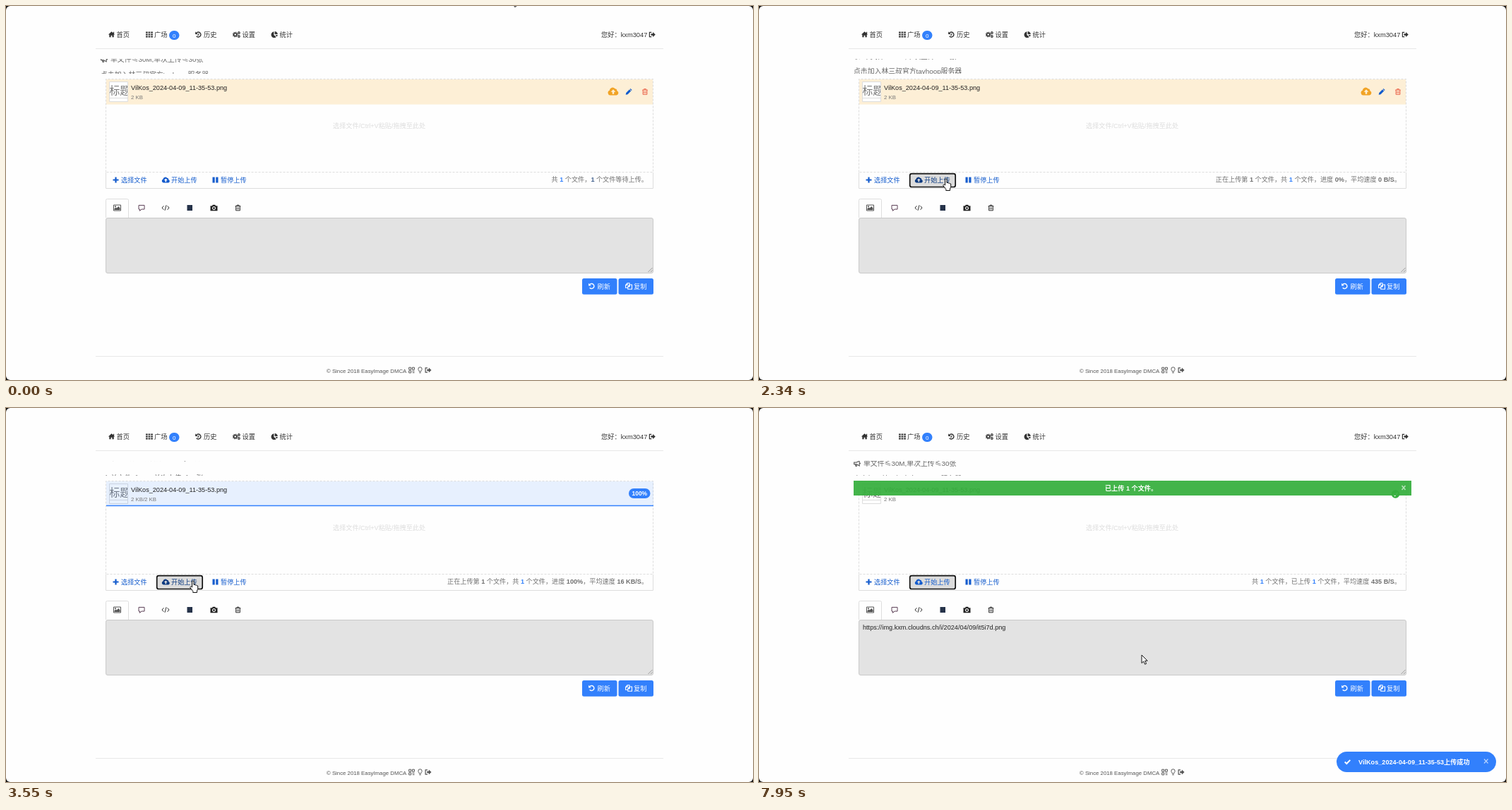
Animation, 1058 px wide and 530 px high, one loop 8000 ms. Source, as an HTML page:

```html
<!DOCTYPE html>
<html>
<head>
<meta charset="utf-8">
<title>Upload demo</title>
<style>
html, body { margin: 0; width: 100%; height: 100%; overflow: hidden; background: #111; }
svg { display: block; }
text { font: 9.15px "Liberation Sans", "Noto Sans CJK SC", "Noto Sans CJK", sans-serif; fill: currentColor; }
.nav text { font-size: 9.25px; }
.small { font-size: 7.8px; }
.notice { font-size: 9.85px; }
.wide { font-family: "Noto Sans CJK SC", "Noto Sans CJK", sans-serif; }
.bold { font-weight: bold; }
.hit { font-weight: bold; fill: #3280fc; }
.status text { text-anchor: end; }
.solid { fill: currentColor; }
.line { fill: none; stroke: currentColor; stroke-width: 1.2; }
.edge { fill: none; stroke: #ddd; }
.rule { stroke: #e8e8e8; }
.dash { stroke-dasharray: 3 2; }
</style>
</head>
<body>
<svg width="1058" height="530" viewBox="0 0 1058 530" color="#333">
<defs>
  <path id="home" class="solid" d="M-4.600 0L0-4.200 2.400-2.200V-3.700H3.600V-1L4.600 0H3.200V3.800H.9V1.200H-.9V3.800H-3.200V0Z"/>
  <path id="grid" class="line" style="stroke-width:2;stroke-dasharray:2.700 .9" d="M-5-2.900H5M-5 0H5M-5 2.900H5"/>
  <g id="undo"><path class="line" style="stroke-width:1.400" d="M-2.800-2.200A3.500 3.500 0 1 1-2.800 2.200"/><path class="solid" d="M-4.400-4.200V-.6H-.8Z"/></g>
  <g id="history"><use href="#undo"/><path class="line" style="stroke-width:1" d="M.4-1.800V.7H-1.500"/></g>
  <g id="cogs" class="line"><circle cx="-1.800" r="2.100" style="stroke-width:1.500"/><circle cx="-1.800" r="3.300" style="stroke-dasharray:1.300 1.290"/><circle cx="3.400" cy="-2.500" r="1.300"/><circle cx="3.400" cy="2.500" r="1.300"/></g>
  <g id="pie" class="solid"><path d="M-.6-4.200V.4L2.800 3.500A4.400 4.400 0 1 1-.6-4.200Z"/><path d="M.6-4.600A4.200 4.200 0 0 1 4.800-.4H.6ZM1.200.6H4.800A4.300 4.300 0 0 1 3.700 2.900Z"/></g>
  <g id="exit"><path class="line" d="M-1-3.100H-3.900V3.100H-1"/><path class="solid" d="M-1.800-1.200H.8V-3.400L4.500 0 .8 3.400V1.200H-1.800Z"/></g>
  <path id="horn" class="line" d="M-4.400-1.400H-1L3.200-3.600V3.400L-1 1.200H-4.400ZM-2.800 1.200L-2 4H-.6L-1.200 1.200M4.400-.8V.8"/>
  <path id="cloud" class="solid" fill-rule="evenodd" d="M-3.200 4A2.600 2.600 0 0 1-3.900-1 3.300 3.300 0 0 1 2-2.700 2.100 2.100 0 0 1 4-.6 2.400 2.400 0 0 1 3.400 4ZM0-2.100L-2.500.5H-.9V2.800H.9V.5H2.500Z"/>
  <path id="pencil" class="solid" d="M-4.300 4.300L-3.700 1.500 1-3.200 3.200-1-1.500 3.700ZM1.600-3.800L2.500-4.600 4.600-2.500 3.800-1.600Z"/>
  <path id="trash" class="line" style="stroke-width:1" d="M-3.800-2.500H3.800M-1.400-2.700V-3.900H1.400V-2.700M-2.900-2.500V3.800H2.900V-2.500M-1.100-.8V2.400M1.100-.8V2.400"/>
  <path id="plus" class="line" style="stroke-width:2.200" d="M-4 0H4M0-4V4"/>
  <path id="pause" class="line" style="stroke-width:3.200" d="M-2.400-4V4M2.400-4V4"/>
  <g id="image"><path class="line" style="stroke-width:1" d="M-5-4H5V4H-5Z"/><path class="solid" d="M-4 3V1.300L-2-.7-.8.5 1.800-2 4 .2V3Z"/><circle class="solid" cx="-2.500" cy="-2" r="1"/></g>
  <path id="chat" class="line" style="stroke-width:1" d="M-4-3.600H4V2H0L-2.600 4.300V2H-4Z"/>
  <path id="code" class="line" style="stroke-width:1" d="M-2.600-2.800L-5 0-2.600 2.800M2.600-2.800L5 0 2.600 2.800M1-3.800L-1 3.800"/>
  <path id="camera" class="solid" fill-rule="evenodd" d="M-5-2.800H-2.500L-1.800-4.300H1.800L2.500-2.800H5V4.200H-5ZM0-2A2.500 2.500 0 1 0 .01-2ZM0-.9A1.400 1.400 0 1 1-.01-.9Z"/>
  <path id="copy" class="line" style="stroke-width:1.100" d="M-1.200 2.200H-4.400V-1.600L-2-4.200H1V-2M-2-4.200V-1.600H-4.400M-1.200.6L1.200-2H4.500V4.300H-1.200ZM1.200-2V.6H-1.200"/>
  <path id="tiles" class="line" style="stroke-width:1" d="M-3.800-3.800H-.8V-.8H-3.800ZM.9-3.800H3.900V-.8H.9ZM-3.800.9H-.8V3.900H-3.800ZM.9 1.300H4M1.300 3.600H4"/>
  <path id="bulb" class="line" style="stroke-width:1" d="M-1.200 2C-1.200.5-2.600.2-2.600-1.600A2.600 2.600 0 0 1 2.600-1.600C2.600.2 1.200.5 1.200 2ZM-1.200 3.800H1.200"/>
  <path id="tick" class="line" style="stroke-width:2" d="M-3.800 0L-1.200 2.500 3.800-2.600"/>
  <g id="done"><circle class="solid" r="5.800"/><path fill="none" stroke="#fff" stroke-width="1.800" d="M-3 0L-.8 2.200 3-1.800"/></g>
  <clipPath id="noticeClip"><rect x="127" y="75" width="300" height="21"/></clipPath>
  <clipPath id="thumbClip"><rect x="146" y="107" width="27" height="29"/></clipPath>
  <clipPath id="alertClip"><rect id="alertWindow" x="134" y="103" width="790" height="21"/></clipPath>
</defs>

<rect width="1058" height="530" rx="6" fill="#fefefe"/>

<g class="nav">
  <use href="#home" x="149.500" y="40.500"/><text x="156.500" y="44">首页</text>
  <use href="#grid" x="203" y="40.500"/><text x="210" y="44">广场</text>
  <rect x="231" y="35" width="14.500" height="13" rx="6.500" fill="#3280fc"/><text x="238.200" y="44.500" color="#fff" text-anchor="middle" style="font-size:8px">0</text>
  <use href="#history" x="272.500" y="40.500"/><text x="280" y="44">历史</text>
  <use href="#cogs" x="326.500" y="40.500"/><text x="334.500" y="44">设置</text>
  <use href="#pie" x="380" y="40.500"/><text x="387.500" y="44">统计</text>
  <text x="843" y="44">您好：kxm3047</text><use href="#exit" x="915.300" y="40.500"/>
</g>
<path class="edge rule" d="M127 60.500H931M127 496.500H931"/>

<g clip-path="url(#noticeClip)" color="#666">
  <g class="limit"><use href="#horn" x="139"/><text class="notice" x="148" y="3.600">单文件<tspan class="wide">≤</tspan>30M,单次上传<tspan class="wide">≤</tspan>30张</text></g>
  <text class="notice join" x="134" y="3.600">点击加入林三叔官方tavhoop服务器</text>
</g>

<path class="edge dash" d="M141.500 235.500V103.500H916.500V235.500Z"/>
<path class="edge" d="M141.500 236V258.500H916.500V236"/>
<rect data-show="0,2430" x="142" y="104" width="774" height="35.500" fill="#fdefd6"/>
<g clip-path="url(#thumbClip)">
  <rect x="146" y="107" width="27" height="28.500" fill="#fff"/>
  <text x="146.500" y="125" color="#777" style="font-size:14.800px">标题</text>
  <path class="edge" d="M146.500 107.500H172.500V135.500H146.500ZM146 130.500H173"/>
</g>
<g id="bar">
  <rect class="fillWidth" x="142" y="104" height="34" fill="#3280fc" opacity=".11"/>
  <rect class="fillWidth" x="142" y="137.700" height="1.500" fill="#3280fc"/>
</g>
<text x="177" y="119" color="#222">VilKos_2024-04-09_11-35-53.png</text>
<g color="#777">
  <text class="small" x="177" y="132" data-show="0,2430">2 KB</text>
  <text class="small" x="177" y="132" data-show="2430,6570">2 KB/2 KB</text>
  <text class="small" x="177" y="132" data-show="6570,8000">2 KB</text>
</g>
<g data-show="0,2430">
  <use href="#cloud" color="#f1a325" transform="translate(860 121) scale(1.350)"/>
  <use href="#pencil" x="882" y="121.500" color="#145ccd"/>
  <use href="#trash" x="905" y="121.500" color="#ea644a"/>
</g>
<g data-show="2430,6570">
  <rect x="882" y="114" width="30.500" height="14" rx="7" fill="#3280fc"/>
  <text class="bold" x="897.300" y="124" color="#fff" text-anchor="middle" style="font-size:8.500px">100%</text>
</g>
<use data-show="2600,2830" href="#done" x="873.500" y="122" color="#d3d7df"/>
<g data-show="6570,8000"><use href="#done" x="901.500" y="122" color="#d8e1f0"/><use id="success" href="#done" x="901.500" y="122" color="#38b03f"/></g>
<text id="hint" x="463" y="173">选择文件/Ctrl+V粘贴/拖拽至此处</text>

<rect data-show="2250,8000" x="213.700" y="237.700" width="64.500" height="18.800" rx="2.500" fill="#dcdcdc" stroke="#111" stroke-width="1.700"/>
<g color="#145ccd">
  <use href="#plus" x="155.500" y="246.500"/><text x="163" y="250">选择文件</text>
  <g id="start"><use href="#cloud" x="226.300" y="246.500"/><text x="234" y="250">开始上传</text></g>
  <use href="#pause" x="296.500" y="246.500"/><text x="304" y="250">暂停上传</text>
</g>
<g class="status" color="#707070">
  <text x="909" y="249" data-show="0,2250">共 <tspan class="hit">1</tspan> 个文件，<tspan class="bold" fill="#44628f">1</tspan> 个文件等待上传。</text>
  <text x="909" y="249" data-show="2250,2850">正在上传第 <tspan class="bold">1</tspan> 个文件，共 <tspan class="hit">1</tspan> 个文件，进度 <tspan class="bold">0%</tspan>，平均速度 <tspan class="bold">0 B/S</tspan>。</text>
  <text x="909" y="249" data-show="2850,6570">正在上传第 <tspan class="bold">1</tspan> 个文件，共 <tspan class="hit">1</tspan> 个文件，进度 <tspan class="bold">100%</tspan>，平均速度 <tspan class="bold">16 KB/S</tspan>。</text>
  <text x="909" y="249" data-show="6570,8000">共 <tspan class="hit">1</tspan> 个文件，已上传 <tspan class="hit">1</tspan> 个文件，平均速度 <tspan class="bold">435 B/S</tspan>。</text>
</g>

<rect x="141.500" y="300.500" width="775" height="78" rx="2.500" fill="#e3e3e3" stroke="#c9c9c9"/>
<path class="line" color="#888" style="stroke-width:.8" d="M909.500 377L915.500 371M913 377L915.500 374.500"/>
<path fill="#fefefe" stroke="#ddd" d="M141.500 300V275.500A2 2 0 0 1 143.500 273.500H171.500A2 2 0 0 1 173.500 275.500V300"/>
<use href="#image" x="157.500" y="286" color="#555"/>
<use href="#chat" x="192" y="286" color="#5b3f55"/>
<use href="#code" x="226" y="286"/>
<rect x="256.500" y="282" width="7.500" height="8" fill="#26334a"/>
<use href="#camera" x="294.500" y="286" color="#222"/>
<use href="#trash" x="328.500" y="286"/>
<text data-show="6570,8000" x="147" y="314" color="#222">https://img.kxm.cloudns.ch/i/2024/04/09/it5i7d.png</text>

<g color="#fff">
  <rect x="816" y="386" width="49.500" height="22.800" rx="2.500" fill="#3280fc"/>
  <rect x="867.500" y="386" width="49.500" height="22.800" rx="2.500" fill="#3280fc"/>
  <use href="#undo" x="829.500" y="397"/><text x="837.500" y="400.500">刷新</text>
  <use href="#copy" x="882" y="397"/><text x="889" y="400.500">复制</text>
</g>

<g color="#555">
  <text class="small" x="454" y="519.500">© Since 2018 EasyImage DMCA</text>
  <use href="#tiles" x="574.500" y="516"/><use href="#bulb" x="586.500" y="516"/><use href="#exit" x="598" y="516"/>
</g>

<g data-show="6570,8000" clip-path="url(#alertClip)" color="#fff">
  <rect x="134" y="103" width="790" height="21" fill="#38b03f" opacity=".94"/>
  <g id="alertText"><text class="bold" x="527" y="3.500" text-anchor="middle">已上传 1 个文件。</text>
  <path class="line" opacity=".6" style="stroke-width:1.600" d="M910.500-3.500L915.500 2.500M915.500-3.500L910.500 2.500"/></g>
</g>
<g id="toast" data-show="6570,8000" color="#fff">
  <rect x="-113" y="-14.500" width="226" height="29" rx="14.500" fill="#3280fc"/>
  <use href="#tick" x="-97.500"/>
  <text class="bold" x="-82" y="3.300">VilKos_2024-04-09_11-35-53上传成功</text>
  <path class="line" opacity=".65" d="M96-4L101.500 2M101.500-4L96 2"/>
</g>

<g id="cursor" stroke="#111" fill="#fff" stroke-linejoin="round">
  <path id="arrow" d="M0 0V11.500L2.700 9 4.600 13.200 6.600 12.300 4.700 8.200H8.200Z"/>
  <path id="hand" d="M-.9 9V1.200A1.200 1.200 0 0 1 1.500 1.200V5.500L2.700 5.200 3.600 6 5 5.900 5.700 6.700 7.200 7V11.500L6 14V16.500H.3V14.500L-3.500 9.800A1.200 1.200 0 0 1-1.800 8.200Z"/>
</g>
</svg>
<script>
const $ = selector => document.querySelector(selector);
const timed = [...document.querySelectorAll('[data-show]')].map(node => ({ node, span: node.dataset.show.split(',').map(Number) }));
const clamp = v => Math.min(1, Math.max(0, v));
const progress = (t, from, to) => clamp((t - from) / (to - from));
const smooth = p => p * p * (3 - 2 * p);
const swing = p => .5 - Math.cos(p * Math.PI) / 2;
const linear = p => p;

// Keys are [time, value]; the value is held before the first and after the last.
function track(t, keys, ease = linear) {
  const next = keys.findIndex(key => key[0] > t);
  if (next === 0) return keys[0][1];
  if (next < 0) return keys[keys.length - 1][1];
  const [t0, a] = keys[next - 1], [t1, b] = keys[next];
  return a + (b - a) * ease(progress(t, t0, t1));
}

const cursorX = [[410, 716], [620, 873], [1080, 148], [1210, 214], [1340, 264.5], [7000, 264.5], [7350, 393], [7650, 764], [7950, 542]];
const cursorY = [[410, -11.8], [620, 40], [1080, 195], [1210, 220], [1340, 245], [7000, 245], [7350, 322], [7650, 345], [7950, 350]];
const limitY = [[0, 75.5], [120, 71], [3130, 71], [3131, 119], [3550, 99.5], [6570, 99.5], [6960, 78.5]];
const joinY = [[0, 97.5], [120, 92.5], [3130, 92.5], [3550, 70.5], [6570, 70.5], [6571, 120], [6960, 100]];

function draw(t) {
  for (const { node, span: [from, to] } of timed) node.style.display = t >= from && t < to ? '' : 'none';

  $('.limit').setAttribute('transform', `translate(0 ${track(t, limitY)})`);
  $('.join').setAttribute('transform', `translate(0 ${track(t, joinY)})`);

  const grey = track(t, [[1000, 221], [1160, 115], [1400, 115], [1680, 221]]);
  $('#hint').style.fill = `rgb(${grey},${grey},${grey})`;

  const width = 775 * (1 - (1 - progress(t, 2470, 2950)) ** 3);
  document.querySelectorAll('.fillWidth').forEach(rect => rect.setAttribute('width', width));
  $('#bar').setAttribute('opacity', t < 6570 ? 1 : track(t, [[6570, .8], [7100, 0]]));
  $('#success').setAttribute('opacity', progress(t, 6570, 7100));

  const slide = swing(progress(t, 6454, 6854));
  $('#alertWindow').setAttribute('height', 21 * slide);
  $('#alertText').setAttribute('transform', `translate(0 ${108 + 5.5 * slide})`);
  const pop = progress(t, 6570, 6780);
  $('#toast').setAttribute('transform', `translate(931 501.5) scale(${.947 + .053 * pop})`);
  $('#toast').setAttribute('opacity', .75 + .25 * pop);

  const hovering = t >= 1270 && t < 7050;
  $('#start').setAttribute('color', hovering ? '#0c3a80' : '#145ccd');
  $('#arrow').style.display = hovering ? 'none' : '';
  $('#hand').style.display = hovering ? '' : 'none';
  $('#cursor').setAttribute('transform', `translate(${track(t, cursorX, smooth)} ${track(t, cursorY, smooth)})`);
}

function loop() {
  draw(performance.now() % 8000);
  requestAnimationFrame(loop);
}
loop();
</script>
</body>
</html>
```
